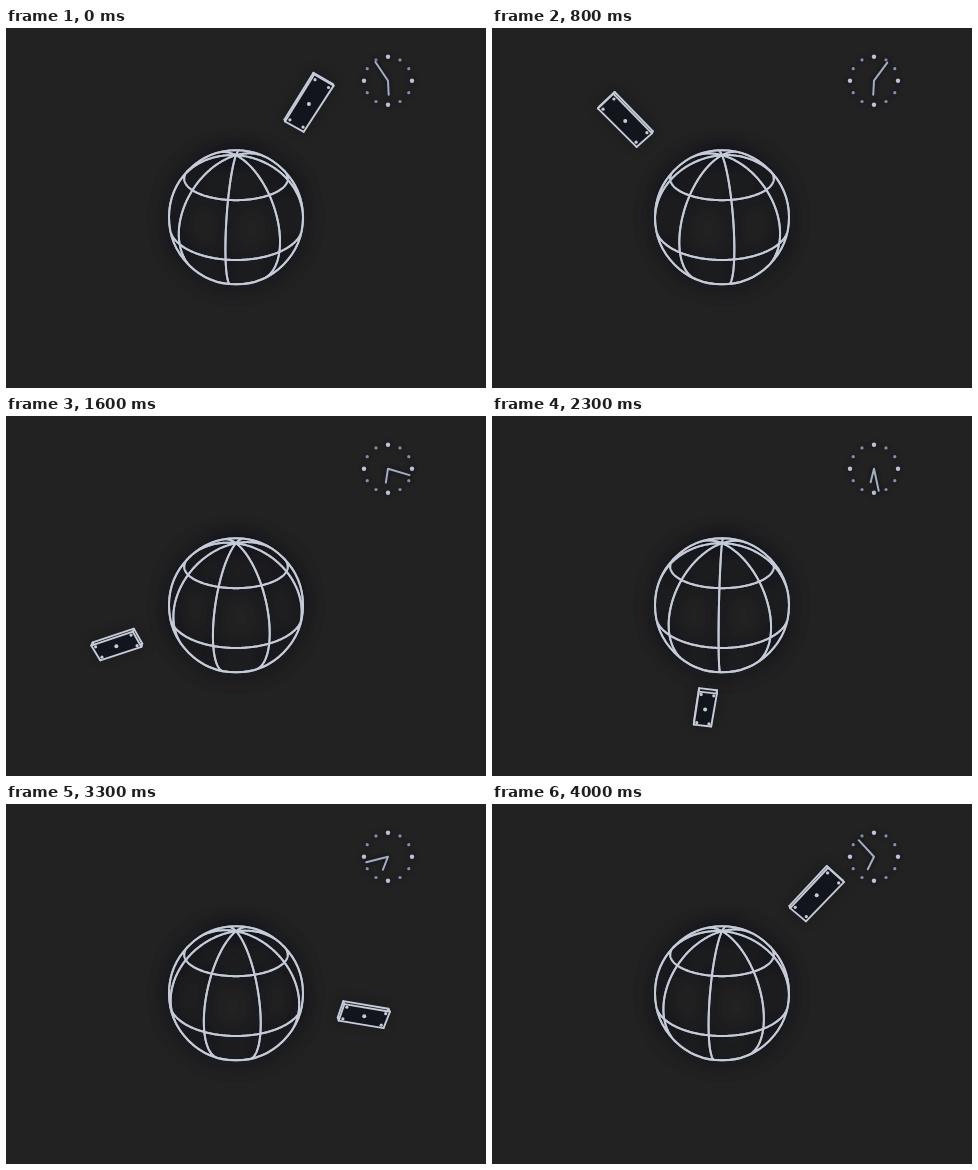
An HTML page with a canvas for the animation above (4100 ms loop, 480 px wide and 360 px high).

```html
<!DOCTYPE html>
<html lang="en">
<head>
<meta charset="utf-8">
<title>Globe, card and clock</title>
<style>
  html, body { margin: 0; width: 100%; height: 100%; overflow: hidden; background: #222; }
  canvas { display: block; }
</style>
</head>
<body>
<canvas id="stage" width="480" height="360"></canvas>
<script>
const ctx = document.getElementById('stage').getContext('2d');
const LOOP = 4100, STEP = 100;
const DEG = Math.PI / 180, TAU = Math.PI * 2;
const LINE = '#c6cbd8', BACK = '#222', HALO = '#080b18';
const CX = 230, CY = 189.3, CAMERA = 510, TILT = 29 * DEG;
const GLOBE = 66.5, LIMB = 67, ORBIT = 133;
const { sin, cos } = Math;

// Tilt a point towards the viewer and apply perspective.
function project(x, y, z) {
  const up = y * cos(TILT) - z * sin(TILT);
  const near = y * sin(TILT) + z * cos(TILT);
  const scale = CAMERA / (CAMERA - near);
  return { x: CX + x * scale, y: CY - up * scale, near };
}

function halo(blur) {
  ctx.shadowColor = HALO;
  ctx.shadowBlur = blur;
}

function dot(x, y, radius) {
  ctx.beginPath();
  ctx.arc(x, y, radius, 0, TAU);
  ctx.fill();
}

function outline(points) {
  ctx.beginPath();
  points.forEach(p => ctx.lineTo(p.x, p.y));
  ctx.closePath();
}

// Add the visible part of a line on the sphere to the current path.
function traceSurface(from, to, toLatLon) {
  let drawing = false;
  for (let angle = from; angle <= to; angle++) {
    const [lat, lon] = toLatLon(angle * DEG);
    const p = project(GLOBE * cos(lat) * sin(lon), GLOBE * sin(lat), GLOBE * cos(lat) * cos(lon));
    const visible = p.near > GLOBE * GLOBE / CAMERA;
    if (visible) drawing ? ctx.lineTo(p.x, p.y) : ctx.moveTo(p.x, p.y);
    drawing = visible;
  }
}

function drawGlobe(phase) {
  const spin = (-8.1 + 90 * phase) * DEG;
  ctx.beginPath();
  ctx.arc(CX, CY, LIMB, 0, TAU);
  for (let i = 0; i < 8; i++) traceSurface(-90, 90, a => [a, spin + i * 45 * DEG]);
  for (const lat of [42, -6]) traceSurface(-180, 180, a => [lat * DEG, a]);
  ctx.lineWidth = 2;
  halo(18);
  ctx.stroke();
  ctx.stroke();
}

function drawCard(phase) {
  const turn = (-29 + 358 * phase) * DEG;
  const place = (along, across, depth) => project(
    -(ORBIT + along) * sin(turn) + across * cos(turn),
    (ORBIT + along) * cos(turn) + across * sin(turn),
    depth);
  const corners = (length, width, depth) =>
    [[1, 1], [1, -1], [-1, -1], [-1, 1]].map(([a, b]) => place(a * length, b * width, depth));
  const back = corners(24, 10, -3), front = corners(24, 10, 3);

  ctx.lineWidth = 1.9;
  halo(12);
  outline(back);
  ctx.stroke();
  ctx.shadowBlur = 0;
  front.forEach((p, i) => {
    outline([p, back[i]]);
    ctx.stroke();
  });
  outline(front);
  ctx.fillStyle = '#13151d';
  ctx.fill();
  ctx.stroke();

  ctx.fillStyle = LINE;
  for (const p of corners(20.5, 7, 3)) dot(p.x, p.y, 1.6);
  const middle = place(0, 0, 3);
  dot(middle.x, middle.y, 2);
}

function drawClock(phase) {
  const minute = -34 + 360 * phase;
  const x = 382, y = 52.7;
  const hand = (degrees, length) => {
    ctx.moveTo(x, y);
    ctx.lineTo(x + length * sin(degrees * DEG), y - length * cos(degrees * DEG));
  };
  halo(5);
  for (let i = 0; i < 12; i++) {
    const a = i * 30 * DEG, major = i % 3 === 0;
    ctx.fillStyle = major ? '#bcc3d6' : '#8590b0';
    dot(x + 24 * sin(a), y - 24 * cos(a), major ? 2.2 : 1.6);
  }
  ctx.beginPath();
  hand(minute, 22.5);
  hand(180 + minute / 12, 14);
  ctx.strokeStyle = '#a5adc0';
  ctx.lineWidth = 2;
  ctx.stroke();
}

function draw(time) {
  const phase = Math.floor(time % LOOP / STEP) * STEP / LOOP;
  ctx.shadowBlur = 0;
  ctx.fillStyle = BACK;
  ctx.fillRect(0, 0, 480, 360);
  ctx.strokeStyle = LINE;
  ctx.lineCap = ctx.lineJoin = 'round';
  drawGlobe(phase);
  drawCard(phase);
  drawClock(phase);
}

const start = performance.now();
function tick() {
  draw(performance.now() - start);
  requestAnimationFrame(tick);
}
tick();
</script>
</body>
</html>
```
